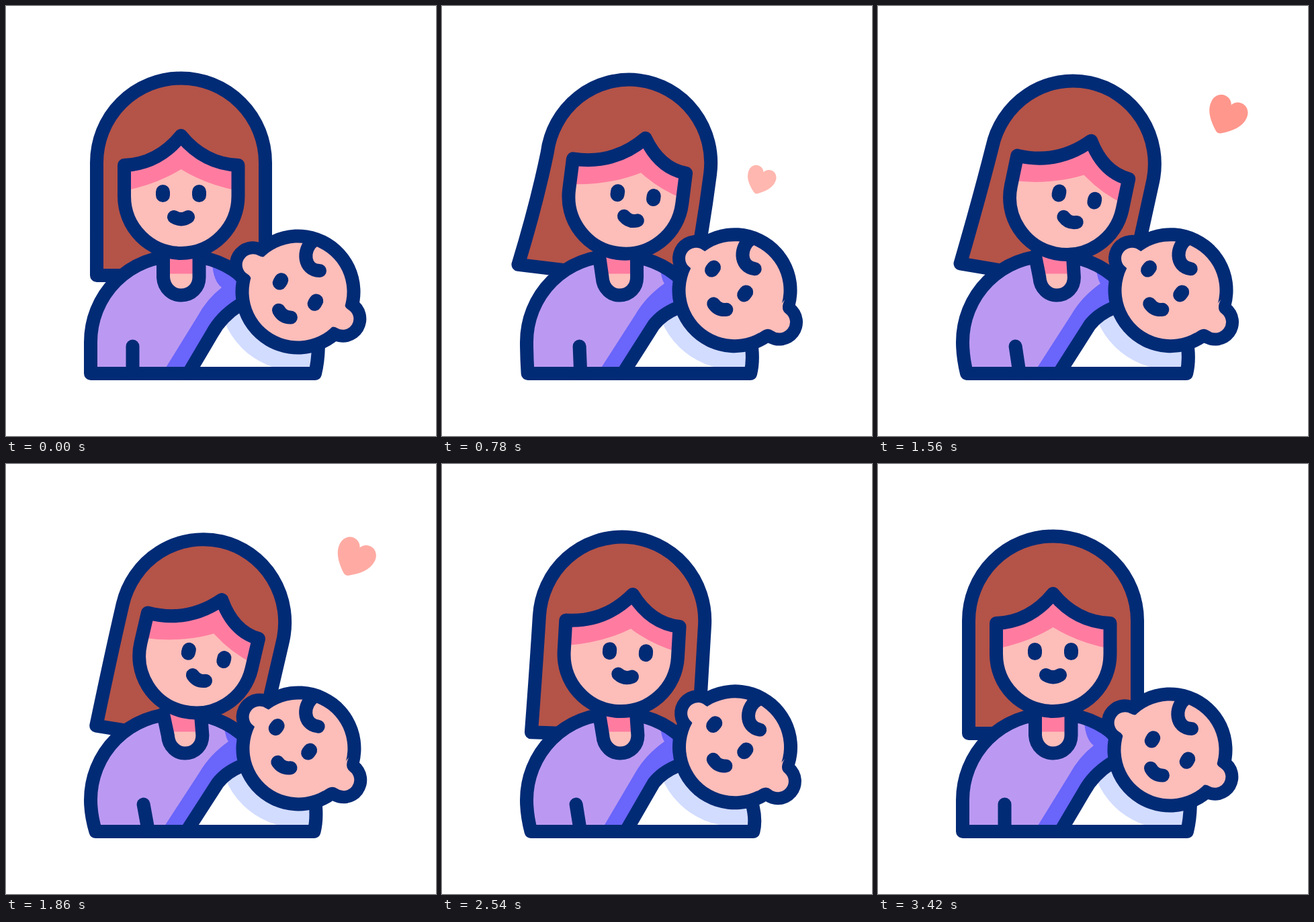
An HTML page that plays this animation: 640x640 px, repeating every 3500 ms.

```html
<!DOCTYPE html>
<html lang="en">
<head>
<meta charset="utf-8">
<title>Mother and baby</title>
<style>
  html, body { margin: 0; width: 100%; height: 100%; overflow: hidden; background: #fff; }
  svg { display: block; width: 100vw; height: 100vh; }
  .line { fill: none; stroke: #022b76; stroke-width: 20; stroke-linecap: round; stroke-linejoin: round; }
  .eye { stroke-width: 21; }
  .ink { fill: #022b76; }
  .skin { fill: #fdbdb9; }
  .pink { fill: #ff7ca0; }
  .dress { fill: #bb99f2; }
  .shade { fill: #6a65fb; }
  .cloth { fill: #fff; }
  .fold { fill: #d2dcff; }
</style>
</head>
<body>
<svg viewBox="0 0 640 640">
  <defs>
    <clipPath id="wrap"><path id="wrapClip"/></clipPath>
    <path id="ear" d="M64 -32Q67 -16 78 -16A16 16 0 0 1 78 16Q67 16 64 32Z"/>
    <path id="smile" d="M-10.5 -2Q0 4.5 10.5 -2"/>
  </defs>

  <path id="heart" fill="#ff978c" d="M-5 26C-18 16 -29 5 -29 -10C-29 -21 -21 -27 -14 -27C-7 -27 -2 -23 0 -18C2 -23 7 -27 14 -27C21 -27 29 -21 29 -10C29 5 18 16 5 26Q0 30 -5 26Z"/>

  <path id="hair" class="line" style="fill:#b45348"/>

  <path id="body" class="dress"/>
  <path id="shade" class="shade"/>
  <path id="bodyLine" class="line"/>
  <path id="arm" class="line"/>
  <path id="neck" class="skin"/>
  <path id="neckShade" class="pink"/>
  <path id="collar" class="line"/>

  <g id="head">
    <path id="face" class="skin"/>
    <path id="brow" class="pink"/>
    <path id="faceLine" class="line"/>
    <path id="eyes" class="line eye" d="M233.5 276.5v5M287.5 276.5v5"/>
    <use id="mouth" href="#smile" class="line"/>
  </g>

  <path id="cloth" class="cloth"/>
  <g clip-path="url(#wrap)"><circle id="fold" class="fold" r="118"/></g>
  <path id="clothLine" class="line"/>

  <g id="baby">
    <g id="earsBack" class="ink">
      <circle cx="78" r="35"/>
      <circle cx="-78" r="35"/>
    </g>
    <circle class="ink" r="93"/>
    <circle class="skin" r="73"/>
    <g id="ears" class="skin">
      <use href="#ear"/>
      <use href="#ear" transform="rotate(180)"/>
    </g>
    <path id="babyEyes" class="line eye" d="M-30.3 -2.5v5M30.3 -2.5v5"/>
    <use id="babyMouth" href="#smile" class="line"/>
    <g transform="rotate(-31)">
      <path id="curl" class="line" d="M22.5 -75.5C6 -63.5 8 -31.5 32.5 -31.5"/>
    </g>
  </g>
</svg>

<script>
const LOOP = 3500, LEAVE = 2200, END = 3420;

const el = id => document.getElementById(id);
const set = (id, name, value) => el(id).setAttribute(name, value);
const draw = (d, ...ids) => ids.forEach(id => set(id, 'd', d));
const move = (id, value) => set(id, 'transform', value);

const ramp = (t, from, to) => Math.min(1, Math.max(0, (t - from) / (to - from)));
const ease = (t, from, to) => {
  const u = ramp(t, from, to);
  return u * u * (3 - 2 * u);
};

// Mother bends in, drifts closer, swings back past upright and settles.
function pose(t) {
  const settle = ease(t, 2900, END);
  const tilt = 7 * ease(t, 0, 700) + 6.3 * ease(t, 600, 2000) - 20 * ease(t, 2180, 2900) + 6.7 * settle;
  const turn = 18.5 * (ease(t, 0, 700) - ease(t, LEAVE, 3120));
  const lean = 8 * (ease(t, 200, LEAVE) - ease(t, LEAVE, END));
  const bend = -24 * ease(t, 0, 1050) + 31 * ease(t, 1050, LEAVE) - 17 * ease(t, LEAVE, 2900) + 10 * settle;
  const sag = 23 * (ease(t, 1100, LEAVE) - ease(t, LEAVE, 2700));

  const roll = 6.4 * ease(t, 0, 540) - 4.6 * ease(t, 1800, 2120) + 7.6 * ease(t, 2120, 2540) - 9.4 * ease(t, 2540, 3000);
  const look = ease(t, 0, 540) - ease(t, 2560, 3000);
  const sway = 1.43 * roll - 10 * look;
  return { tilt, turn, lean, bend, sag, roll, look, sway };
}

function drawHair({ tilt, turn, bend, sag }) {
  const rad = tilt * Math.PI / 180, cos = Math.cos(rad), sin = Math.sin(rad);
  const spin = (x, y, dx = 0, dy = 0) =>
    [261 + (x - 261) * cos - (y - 381) * sin + dx, 381 + (x - 261) * sin + (y - 381) * cos + dy];
  const left = 135 + 0.1 * turn, right = 386 - 0.25 * turn;
  draw(`M${spin(135, 401, bend, sag)}Q${spin(left, 310, 0.3 * bend)} ${spin(left, 233)}`
    + `A${(right - left) / 2} ${125.5 - 0.06 * turn} ${tilt} 0 1 ${spin(right, 233)}`
    + `Q${spin(right, 317)} ${spin(right, 401, 0.3 * bend)}Z`, 'hair');
}

function drawHead({ tilt, turn }) {
  const peak = 260.5 + turn, mid = 0.6 * turn, dip = 0.2 * turn;
  const fringe = `M176 237Q${226 + mid} ${235 + dip} ${peak} 193Q${295 + mid} 235 345.5 237`;
  move('head', `rotate(${tilt} 261 381)`);
  draw(`${fringe}V283A84.75 85 0 0 1 176 283Z`, 'face', 'faceLine');
  draw(`${fringe}V275Q${298 + mid} 266 ${peak} ${243 + dip / 2}Q${223 + mid} ${266 + dip} 176 275Z`, 'brow');
  move('eyes', `translate(${0.8 * turn})`);
  move('mouth', `translate(${260.5 + 0.63 * turn} 316) rotate(${0.6 * turn})`);
}

function drawBody({ turn, lean, look, sway }) {
  const foot = 126 + lean, hand = 188.5 + 0.87 * turn;
  draw(`M${foot} 547Q126 522 126 500A128 128 0 0 1 254 372H268A128 128 0 0 1 396 500V547Z`, 'body', 'bodyLine');
  draw(`M${238 + sway} 538L${285 + 3 * look} ${462 - 3 * look}`
    + `Q${299 + 4 * look} ${436 - 3 * look} ${321 + 10 * look} ${419 - 6 * look}`
    + `Q${309 + 17 * look} ${410 - 4 * look} ${307 + 17 * look} 384L345 400L360 450L306 489L${272 + sway} 547Z`, 'shade');
  draw(`M${hand} 506.5L${hand + lean} 547`, 'arm');

  const u = turn / 19, drop = 0.4 * lean;
  const l = 234 + 4 * u + drop, r = 287.5 + 2 * u + drop, top = 287.5 + 2.5 * u;
  const c = (l + r) / 2;
  draw(`M234 372L${l} 404C${l + 1} 421 ${c - 12} 431 ${c} 430.5C${c + 15} 430.5 ${r} 419 ${r} 404L${top} 372`, 'neck', 'collar');
  draw(`M234 372L${l} 398.5H${r}L${top} 372Z`, 'neckShade');
}

function drawBaby({ roll, look, sway }) {
  const x = 434.5 + 0.16 * roll, y = 425.5 - 0.6 * (roll - 2.5 * look);
  draw(`M${271.5 - 1.5 * look + sway} 547L${307 + 8 * look} ${487 - 12 * look}`
    + `Q${320 + 7 * look} ${463 - 4 * look} ${346 + 5 * look} ${446 + 3 * look}L440 430`
    + `L${465 - 5 * look} 500Q${465 + sway} 527 ${460 + sway} 547Z`, 'cloth', 'clothLine', 'wrapClip');
  set('fold', 'cx', x);
  set('fold', 'cy', y);

  const curl = 2 * roll - 18.8 * look;
  const earShift = `translate(${3.6 * look} ${-2.7 * look})`;
  move('baby', `translate(${x} ${y}) rotate(${31 + roll})`);
  move('ears', earShift);
  move('earsBack', earShift);
  move('babyEyes', `translate(${-15 * look} ${-5.7 * look})`);
  move('babyMouth', `translate(${-2 * look} ${40 - 5.5 * look}) rotate(${-13 * look})`);
  move('curl', `translate(${curl} ${curl * 0.6})`);
}

function drawHeart(t) {
  const u = ramp(t, 540, 2160);
  const x = 460 + 78 * u + 16 * Math.sin(5 * (u - 0.12));
  const y = 300 - 287 * u + 112 * u * u;
  const size = 0.5 + 0.5 * Math.sin(Math.PI / 2 * ramp(t, 540, 1300));
  move('heart', `translate(${x} ${y}) rotate(${19 + 10 * u}) scale(${size})`);
  set('heart', 'opacity', ramp(t, 540, 890) * (1 - ease(t, 1740, 2160)));
}

function render(t) {
  const p = pose(t);
  drawHair(p);
  drawBody(p);
  drawHead(p);
  drawBaby(p);
  drawHeart(t);
}

const start = performance.now();
function tick() {
  render((performance.now() - start) % LOOP);
  requestAnimationFrame(tick);
}
render(0);
requestAnimationFrame(tick);
</script>
</body>
</html>
```
